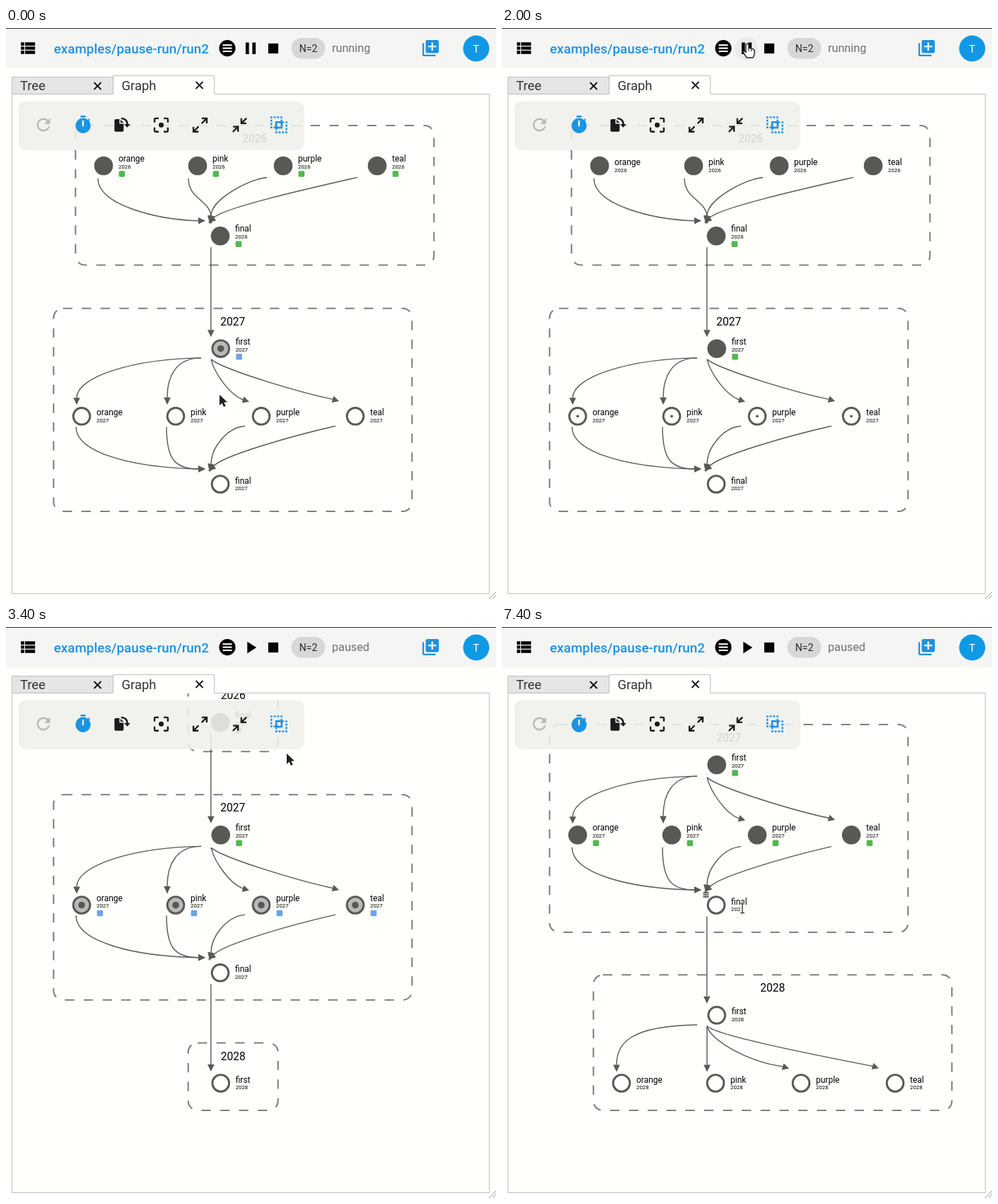
An HTML page with a canvas that plays this animation: 693 by 808 pixels, repeating every 8 s.

```html
<!DOCTYPE html>
<html lang="en">
<head>
<meta charset="utf-8">
<title>Workflow graph</title>
<style>
html, body { margin: 0; width: 100%; height: 100%; overflow: hidden; background: #fffffb; }
canvas { display: block; }
</style>
</head>
<body>
<canvas id="stage" width="693" height="808"></canvas>
<script>
const g = document.getElementById('stage').getContext('2d');
const LOOP = 8000, DARK = '#585955', BLUE = '#1c93e3', PAGE = '#fffffb';
const JOB = { done: '#53b84f', run: '#6ba4e8', sent: '#6edcc5' };
const R = 13.3; // node radius, also the dash length and corner radius of a group

// Icons on a 24 unit grid
const ICON = {
  list: 'M9 5V9H21V5M9 19H21V15H9M9 14H21V10H9M4 9H8V5H4M4 19H8V15H4M4 14H8V10H4V14Z',
  pause: 'M14 19H18V5H14M6 19H10V5H6Z',
  play: 'M8 5.1V19.1L19 12.1Z',
  stop: 'M6 6H18V18H6Z',
  add: 'M19 11H15V15H13V11H9V9H13V5H15V9H19M20 2H8A2 2 0 0 0 6 4V16A2 2 0 0 0 8 18H20A2 2 0 0 0 22 16V4A2 2 0 0 0 20 2M4 6H2V20A2 2 0 0 0 4 22H18V20H4V6Z',
  refresh: 'M17.65 6.35C16.2 4.9 14.2 4 12 4A8 8 0 0 0 12 20C15.7 20 18.8 17.5 19.7 14H17.65C16.8 16.3 14.6 18 12 18A6 6 0 0 1 12 6C13.7 6 15.1 6.7 16.2 7.8L13 11H20V4Z',
  timer: 'M19 7.4L20.4 6C20 5.5 19.5 5 19 4.6L17.6 6C16 4.7 14.1 4 12 4A9 9 0 1 0 21 13C21 10.9 20.3 8.9 19 7.4M13 14H11V7H13V14M15 1H9V3H15V1Z',
  rotate: 'M4.5 5H9V10.5H14V18.5A1.5 1.5 0 0 1 12.5 20H4.5A1.5 1.5 0 0 1 3 18.5V6.5A1.5 1.5 0 0 1 4.5 5ZM10.3 5.5L14 9.2H10.3ZM11 3C16 3 19.5 6 19.5 11H22L18.3 15L14.6 11H17.3C17.3 7.5 15 5.2 11 5.2Z',
  focus: 'M12 9A3 3 0 1 0 12 15A3 3 0 1 0 12 9M19 19H15V21H19A2 2 0 0 0 21 19V15H19M19 3H15V5H19V9H21V5A2 2 0 0 0 19 3M5 5H9V3H5A2 2 0 0 0 3 5V9H5M5 15H3V19A2 2 0 0 0 5 21H9V19H5V15Z',
  expand: 'M10 21V19H6.4L10.9 14.5L9.5 13.1L5 17.6V14H3V21H10M14.5 10.9L19 6.4V10H21V3H14V5H17.6L13.1 9.5Z',
  collapse: 'M19.5 3.1L15 7.6V4H13V11H20V9H16.4L20.9 4.5M4 13V15H7.6L3.1 19.5L4.5 20.9L9 16.4V20H11V13Z',
};
for (const k in ICON) ICON[k] = new Path2D(ICON[k]);
const ARROW = new Path2D('M0 0V15L3.5 11.8L6 17L8.7 15.8L6.2 10.8L11 10.5Z');
const HAND = new Path2D('M-2 1.5Q0 -1 2 1.5V7Q4 5.5 5.5 7.5Q7.5 6.5 8.5 8.5Q10 8.3 10 10V15L8 20H-1L-5.5 13Q-6.5 10.5 -4 10.5L-2 12.5Z');
const BEAM = new Path2D('M-3 -7Q0 -7 0 -5Q0 -7 3 -7M0 -5V5M-3 7Q0 7 0 5Q0 7 3 7');

// [time, x, y, kind]
const POINTER = [
  [0, 302, 519], [200, 304, 500], [300, 306, 440], [400, 307, 398],
  [600, 314, 330], [700, 323, 190], [800, 327, 125], [900, 318, 93], [1000, 340, 52],
  [1100, 370, 25, 'hand'], [1300, 368, 24, 'hand'], [1400, 365, 23, 'hand'],
  [1500, 362, 22, 'hand'], [1600, 360, 21, 'hand'], [1800, 357, 21, 'hand'],
  [2000, 347, 22, 'hand'], [2200, 340, 25, 'hand'], [2500, 340, 25],
  [3000, 346, 42], [3100, 361, 82], [3200, 380, 132], [3300, 392, 165], [3400, 397, 179],
  [7000, 397, 207], [7300, 366, 312], [7400, 340, 398, 'beam'],
];
const RIPPLE = [[0, 0], [1100, .04], [2400, .09], [2500, .15], [2600, .19], [2700, .1], [2800, 0]];
const at = (keys, t) => keys.filter(k => k[0] <= t).pop();

function text(s, x, y, size, color = '#000', weight = 400, align = 'left') {
  g.font = `${weight} ${size}px Roboto, sans-serif`;
  g.textAlign = align;
  g.fillStyle = color;
  g.fillText(s, x, y);
}
function box(x, y, w, h, r, color) {
  g.beginPath();
  g.roundRect(x, y, w, h, r);
  g.fillStyle = color;
  g.fill();
}
function disc(x, y, r, color) {
  g.beginPath();
  g.arc(x, y, r, 0, 7);
  g.fillStyle = color;
  g.fill();
}
function line(color, width, ...pts) {
  g.beginPath();
  pts.forEach(p => g.lineTo(...p));
  g.strokeStyle = color;
  g.lineWidth = width;
  g.stroke();
}
function icon(name, x, y, color = '#000', scale = 1.18) {
  g.save();
  g.translate(x, y);
  g.scale(scale, scale);
  g.translate(-12, -12);
  g.fillStyle = color;
  g.fill(ICON[name], 'evenodd');
  g.restore();
}
function bars(x, y, w, gap, width, color) {
  for (const d of [-gap, 0, gap]) line(color, width, [x - w / 2, y + d], [x + w / 2, y + d]);
}

// Curve from a to d with controls b and c, ending in an arrow head at tip
function edge(a, b, c, d, tip) {
  g.beginPath();
  g.moveTo(...a);
  g.bezierCurveTo(...b, ...c, ...d);
  g.strokeStyle = DARK;
  g.lineWidth = 1.4;
  g.stroke();
  const n = Math.hypot(tip[0] - d[0], tip[1] - d[1]) / 4.8;
  const u = (tip[0] - d[0]) / n, v = (tip[1] - d[1]) / n;
  g.beginPath();
  g.moveTo(...tip);
  g.lineTo(d[0] - v, d[1] + u);
  g.lineTo(d[0] + v, d[1] - u);
  g.fillStyle = DARK;
  g.fill();
}
const down = (x, y0, y1) => edge([x, y0], [x, y0], [x, y0], [x, y1 - 10], [x, y1]);
const link = (last, first) => down(289.8, last + 16, first - 16.5);

function fanOut(off, first, kids) {
  const y0 = first + 13.5 + (kids - first - 96) * .8, h = kids - 16 - y0;
  const p = (x, f) => [x, y0 + f * h];
  edge(p(276, 0), p(180, .02), p(100 + off, .4), p(100 + off, .85), p(100 + off, 1));
  if (off) down(290, y0 + 1, kids - 16);
  else edge(p(276, 0), p(240, 0), p(228, .4), p(228, .84), p(228, 1));
  edge(p(290, .03), p(295, .33), p(316 + off / 2, .78), p(335 + off, .89), p(344 + off, .93));
  edge(p(290, .03), p(310, .27), p(420 + off, .75), p(462 + off, .88), p(471 + off, .92));
}
function fanIn(off, kids, last) {
  const y0 = kids + 15 + (last - kids - 96) * .8, h = last - 21.5 - y0;
  const p = (x, f) => [x, y0 + f * h];
  edge(p(99 + off, 0), p(99 + off, .62), p(180 + off, .97), p(272, 1), p(282, 1));
  if (off) edge(p(258, 0), p(258, .5), p(288, .5), p(290, .9), p(290, 1.08));
  else edge(p(227, 0), p(227, .75), p(238, 1), p(272, 1), p(282, 1));
  edge(p(338 + off, -.02), p(312 + off, .02), p(290, .5), p(290, .88), p(288, 1.08));
  edge(p(466 + off, -.02), p(400 + off, .23), p(305, .7), p(294, .93), p(286, 1.05));
}

function node(name, year, x, y, state = 'wait', job) {
  disc(x, y, R, DARK);
  if (state !== 'done') {
    disc(x, y, 10.4, state === 'run' ? '#b9b9b7' : PAGE);
    if (state === 'run') disc(x, y, 4.8, DARK);
    if (state === 'sent') disc(x, y, 1.9, DARK);
    if (state === 'prep') bars(x - 14.5, y - 14.5, 8, 2.8, 1.6, '#333');
  }
  const up = job ? 0 : 5;
  text(name, x + 21, y - 6 + up, 12);
  text(year, x + 21, y + 3.8 + up, 7.8);
  if (job) box(x + 21.6, y + 7.3, 8.6, 8.4, 1.6, JOB[job]);
}

// One cycle: rows are the heights of its first, middle and final tasks; each look is [state, job]
function cycle(year, off, [first, kids, last], looks) {
  const top = (first || kids || last) - 57;
  const tall = last && looks[2][0] === 'done';
  const bottom = (last || kids || first) + (tall ? 41.2 : 38.5);
  const left = kids ? 67.3 + off : 257.7, width = kids ? 507 : 127;
  g.beginPath();
  g.roundRect(left, top, width, bottom - top, R);
  g.setLineDash([R, R]);
  g.strokeStyle = '#808080';
  g.lineWidth = 2.1;
  g.stroke();
  g.setLineDash([]);
  text(year, left + width / 2, top + 24, 15.6, '#000', 400, 'center');
  if (first && kids) fanOut(off, first, kids);
  if (kids && last) fanIn(off, kids, last);
  if (first) node('first', year, 303.7, first, ...looks[0]);
  if (kids) ['orange', 'pink', 'purple', 'teal'].forEach((name, i) =>
    node(name, year, [107, 240, 361, 494][i] + off, kids, ...looks[1]));
  if (last) node('final', year, 303, last, ...looks[2]);
}

function graph(t) {
  const wait = ['wait'], done = ['done', 'done'], old = ['done'];
  if (t < 2200) {
    const early = t < 700;
    const kids = early ? wait : t < 1000 ? ['prep'] : ['sent'];
    cycle(2026, 31, [0, 195, 294.3], [old, early ? done : old, done]);
    cycle(2027, 0, [453.7, 549.3, 645.5], [early ? ['run', 'run'] : done, kids, wait]);
    link(294.3, 453.7);
  } else if (t < 6500) {
    const ended = t >= 6200;
    const kids = ended ? done : t < 3200 ? ['sent', 'sent'] : ['run', 'run'];
    cycle(2026, 31, [0, 0, 135], [old, old, ended ? old : done]);
    cycle(2027, 0, [294.3, 393.5, 489.3], [done, kids, ended ? ['prep'] : wait]);
    cycle(2028, 62, [645.5, 0, 0], [wait]);
    link(135, 294.3);
    link(489.3, 645.5);
  } else {
    cycle(2027, 0, [195, 294.3, 393.5], [done, done, ['prep']]);
    cycle(2028, 62, [549.3, 645.5, 0], [wait, wait]);
    link(393.5, 549.3);
  }
}

function toolbar() {
  box(17.5, 103.5, 404.5, 69.5, 11, 'rgba(239,239,236,.88)');
  icon('refresh', 53, 137, '#b8b8b5');
  icon('timer', 109, 137, BLUE);
  ['rotate', 'focus', 'expand', 'collapse'].forEach((name, i) =>
    icon(name, [164, 219.5, 274.5, 330.5][i], 137.3, '#1b1b1a'));
  g.strokeStyle = BLUE;
  g.lineWidth = 2.4;
  g.strokeRect(382, 133.2, 8, 8);
  g.setLineDash([2.9, 1.9]);
  g.lineDashOffset = 1.45;
  g.strokeRect(375.2, 126.4, 14.4, 14.4);
  g.strokeRect(382.2, 133.4, 14.4, 14.4);
  g.setLineDash([]);
  g.lineDashOffset = 0;
}

function header(t) {
  const paused = t >= 3000;
  g.fillStyle = '#f5f5f3';
  g.fillRect(0, 0, 693, 57);
  g.fillStyle = '#2b2b2b';
  g.fillRect(0, 0, 693, 1);
  icon('list', 30.5, 28.5);
  text('examples/pause-run/run2', 67.7, 35.6, 18.82, BLUE, 500);
  disc(313, 28.6, 11.6, '#000');
  bars(313, 28.6, 13, 4.4, 2.1, '#fff');
  disc(345.5, 29, 16.4, `rgba(0,0,0,${at(RIPPLE, t)[1]})`);
  icon(paused ? 'play' : 'pause', 346, 28.8, t >= 2500 && !paused ? '#5c5c5b' : '#000');
  icon('stop', 378, 29);
  box(403.5, 14, 48, 29.5, 14.7, '#d7d7d5');
  text('N=2', 427.5, 34.3, 14, '#2a2a2a', 400, 'center');
  text(paused ? 'paused' : 'running', 461, 34.3, 16.2, '#70706e');
  icon('add', 600.5, 28.5, BLUE, 1.16);
  disc(665, 29, 18.5, '#1098e4');
  text('T', 665, 34.5, 15, '#fff', 400, 'center');
}

function cross(x, y) {
  line('#111', 1.8, [x - 5, y - 5], [x + 5, y + 5]);
  line('#111', 1.8, [x + 5, y - 5], [x - 5, y + 5]);
}
function tabs() {
  const rim = '#bfbfbc';
  g.fillStyle = '#e5e5e3';
  g.fillRect(8, 69, 143, 24);
  line(rim, 1, [8.5, 93], [8.5, 69.5], [151, 69.5]);
  line(rim, 1, [151.5, 93.5], [8.5, 93.5], [8.5, 800.5], [683.5, 800.5], [683.5, 93.5], [294.5, 93.5], [294.5, 67.5], [151.5, 67.5], [151.5, 93.5]);
  text('Tree', 20, 88.2, 18.4, '#333');
  text('Graph', 163.5, 88.2, 18.4, '#333');
  cross(129.5, 82);
  cross(273.5, 81);
  line('#999', 1, [683, 808], [693, 798]);
  line('#999', 1, [688, 808], [693, 803]);
}

function pointer(t) {
  const [, x, y, kind] = at(POINTER, t);
  g.save();
  g.translate(x, y);
  g.lineJoin = 'round';
  if (kind === 'beam') {
    for (const [color, width] of [['#fff', 3], ['#222', 1.2]]) {
      g.strokeStyle = color;
      g.lineWidth = width;
      g.stroke(BEAM);
    }
  } else {
    const hand = kind === 'hand', shape = hand ? HAND : ARROW;
    g.strokeStyle = hand ? '#222' : '#fff';
    g.lineWidth = hand ? 1.4 : 2;
    if (!hand) g.stroke(shape);
    g.fillStyle = hand ? '#fff' : '#222';
    g.fill(shape);
    if (hand) {
      g.stroke(shape);
      for (const k of [2, 5.5]) line('#222', 1, [k, 7], [k, 11]);
    }
  }
  g.restore();
}

function draw(t) {
  g.fillStyle = PAGE;
  g.fillRect(0, 0, 693, 808);
  g.save();
  g.beginPath();
  g.rect(9, 94, 674, 706);
  g.clip();
  graph(t);
  toolbar();
  g.restore();
  header(t);
  tabs();
  if (t >= 800 && t < 1000) {
    box(247, 177, 166, 37, 4, 'rgba(80,80,79,.93)');
    text('Decrease Spacing', 330, 201.5, 16.4, '#f4f4f2', 400, 'center');
  }
  pointer(t);
}

function tick() {
  draw(performance.now() % LOOP);
  requestAnimationFrame(tick);
}
tick();
</script>
</body>
</html>
```
